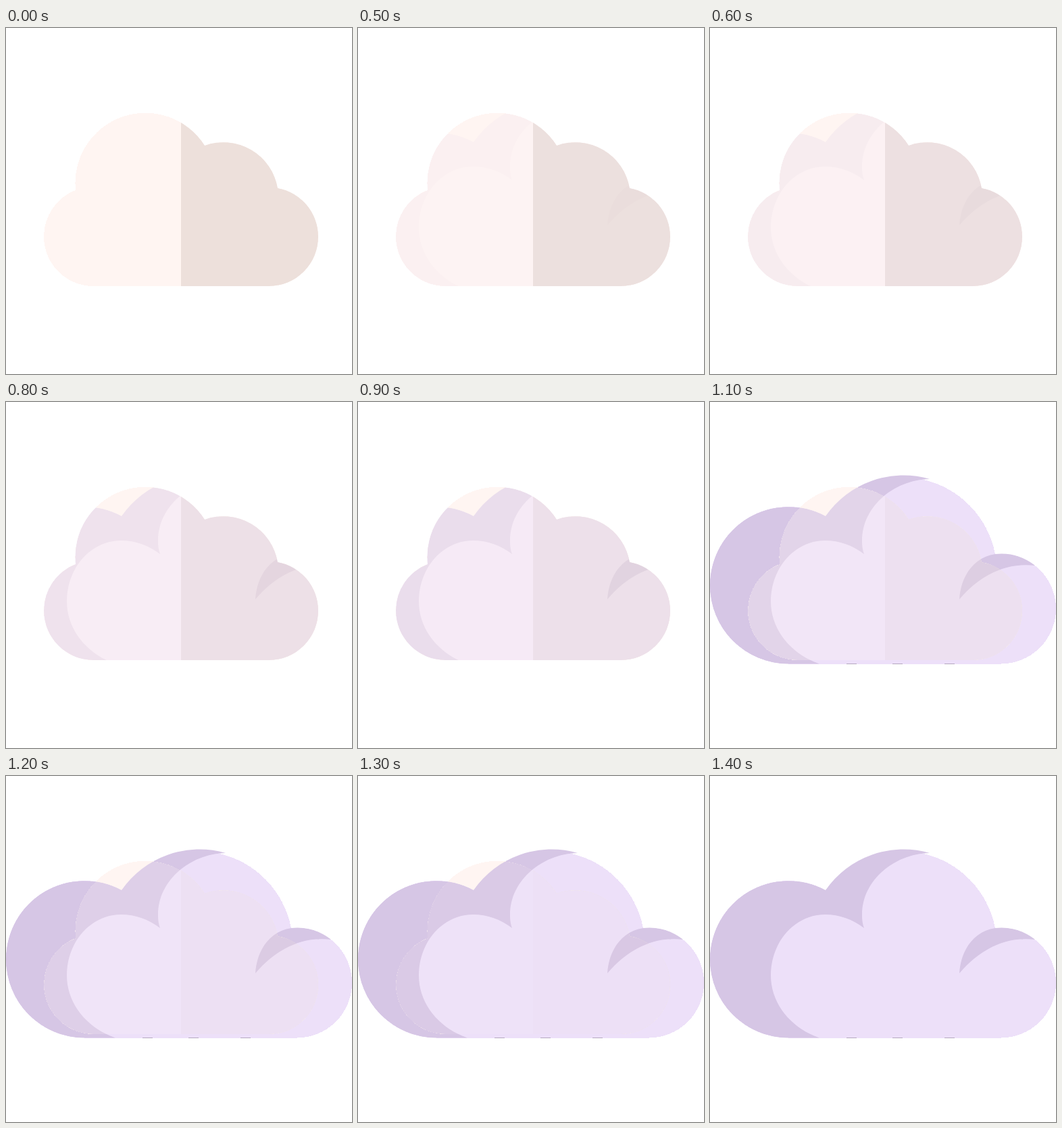
Recreate the animation shown at these times as an HTML page. Size 512x512 px, loop 8 s.

```html
<!DOCTYPE html>
<html lang="en">
<head>
<meta charset="utf-8">
<title>Cloud crossfade</title>
<style>
  html, body { margin: 0; width: 100%; height: 100%; overflow: hidden; background: #fff; }
  svg { display: block; width: 100%; height: 100%; }
  .crisp { shape-rendering: crispEdges; }
</style>
</head>
<body>
<svg viewBox="0 0 512 512">
  <defs>
    <path id="warmShape" d="M129.5 382A73.5 73.5 0 0 1 56 308.5A73.5 73.5 0 0 1 103 240A103.8 103.8 0 0 1 294 174A81.5 81.5 0 0 1 402 237A73 73 0 0 1 462 309A73 73 0 0 1 389 382Z"/>
    <clipPath id="warmClip"><use href="#warmShape" class="crisp"/></clipPath>
    <g id="lilac">
      <path class="crisp" fill="#ede0f9" d="M116 387.5A116 116 0 0 1 0 271A116 116 0 0 1 171 169A140.2 140.2 0 0 1 422 225A81.5 81.5 0 0 1 512 306A81.5 81.5 0 0 1 430.5 387.5Z"/>
      <g fill="#d6c6e5">
        <path d="M162 387.5H116A116 116 0 0 1 0 271A116 116 0 0 1 171 169A140.2 140.2 0 0 1 325 114C272 115 225 155 225 205C225 209 225 217 228 225C211 212 192 205 170 205C126 205 90 245 90 295C90 337 120 373 162 387.5Z"/>
        <path d="M369 292C371 258 390 230 422 225A81.5 81.5 0 0 1 481 242C440 237 400 255 369 292Z"/>
      </g>
      <path class="crisp" fill="#b5a9c0" d="M202 387h15v1h-15zM270 387h15v1h-15zM347 387h15v1h-15z"/>
    </g>
  </defs>
  <use id="back" href="#lilac"/>
  <g id="warm" class="crisp">
    <use href="#warmShape" fill="#fff5f2"/>
    <rect x="259" y="120" width="210" height="270" fill="#ede0db" clip-path="url(#warmClip)"/>
  </g>
  <g clip-path="url(#warmClip)"><use id="overlay" href="#lilac"/></g>
</svg>
<script>
  const LOOP = 8000, FADE_START = 500, STEP = 100, STEPS = 10;
  const [back, warm, overlay] = ['back', 'warm', 'overlay'].map(id => document.getElementById(id));
  const show = (el, on) => el.setAttribute('visibility', on ? 'visible' : 'hidden');

  function render(t) {
    const step = Math.floor((t - FADE_START) / STEP) + 1;
    const mix = Math.max(0, Math.min(STEPS, step)) / STEPS;
    // Outside the overlap the new cloud appears all at once, past the halfway point.
    show(back, mix > 0.5);
    show(warm, mix < 1);
    show(overlay, mix > 0 && mix < 1);
    overlay.setAttribute('opacity', mix);
  }

  const start = performance.now();
  function tick() {
    render((performance.now() - start) % LOOP);
    requestAnimationFrame(tick);
  }
  tick();
</script>
</body>
</html>
```
